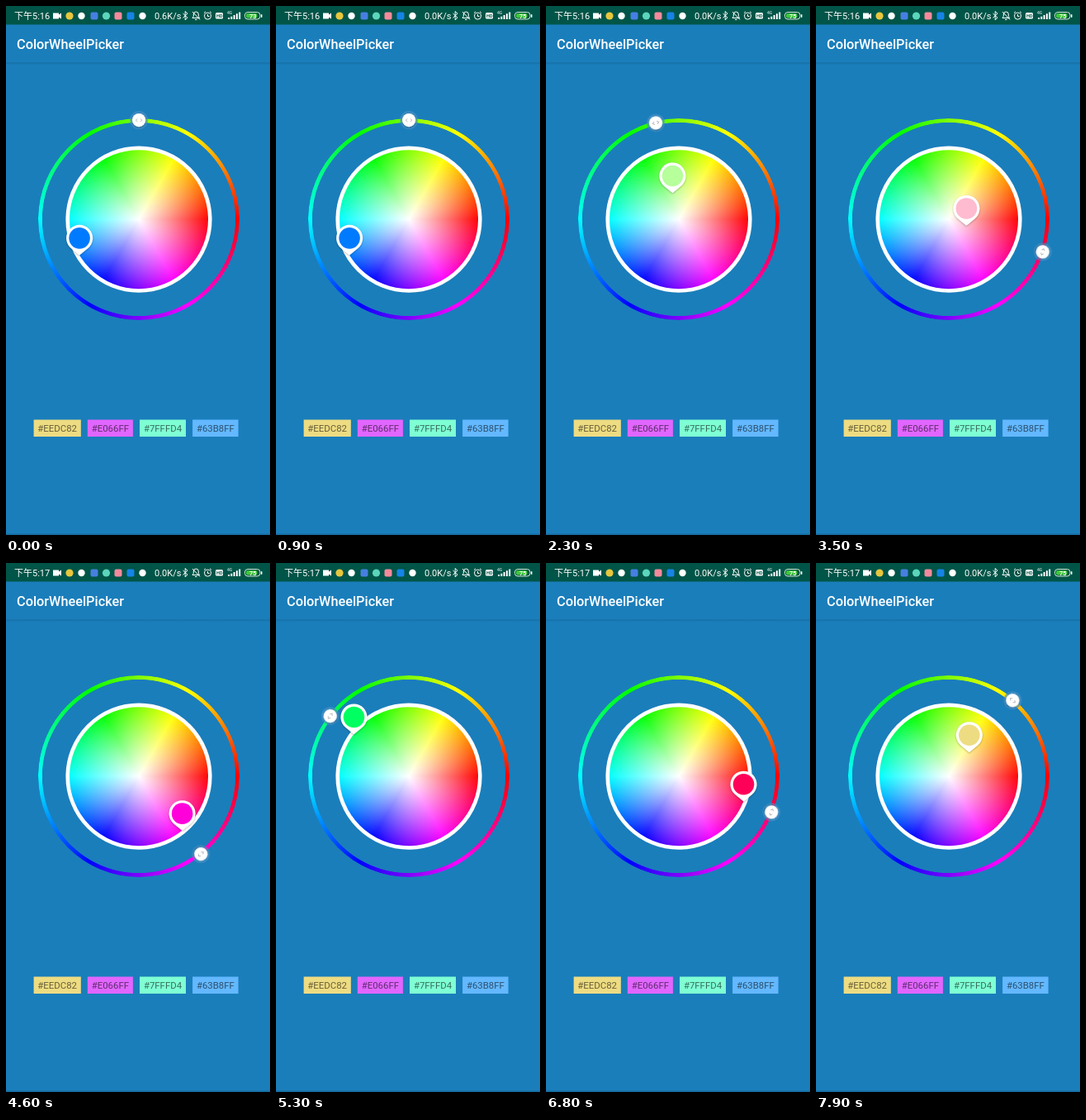
These frames come from a looping animation (320 by 640 pixels, 8 s). An HTML page:

```html
<!DOCTYPE html>
<html lang="en">
<head>
<meta charset="utf-8">
<title>Colour wheel</title>
<style>
  html, body { margin: 0; width: 100%; height: 100%; overflow: hidden; background: #1a7ebb; }
  #stage { position: relative; width: 320px; height: 640px; overflow: hidden; background: #1a7ebb; }
  .disc { position: absolute; border-radius: 50%;
    --hues: conic-gradient(from 90deg, #f00, #f0f, #00f, #0ff, #0f0, #ff0, #f00); }
  #ring { left: 39.2px; top: 136.4px; width: 243.8px; height: 243.8px; background: var(--hues);
    -webkit-mask: radial-gradient(circle, transparent 116.7px, #000 117.5px);
    mask: radial-gradient(circle, transparent 116.7px, #000 117.5px); }
  svg { position: absolute; left: 0; top: 0; }
  #wheel { left: 75px; top: 172px; width: 172px; height: 172px;
    background: radial-gradient(circle closest-side, #fff, rgba(255,255,255,0)), var(--hues); }
  text { font-family: Roboto, sans-serif; }
  #clock { font-family: Roboto, "Noto Sans CJK SC", "Noto Sans CJK", sans-serif; }
</style>
</head>
<body>
<div id="stage">
  <div id="ring" class="disc"></div>
  <div id="wheel" class="disc"></div>
  <svg width="320" height="640" viewBox="0 0 320 640">
    <defs>
      <linearGradient id="edge" x2="0" y2="1">
        <stop stop-color="#000" stop-opacity=".13"/>
        <stop offset="1" stop-color="#000" stop-opacity="0"/>
      </linearGradient>
      <filter id="soft" x="-30%" y="-30%" width="160%" height="160%">
        <feDropShadow dx="0" dy="1" stdDeviation="1" flood-color="#000" flood-opacity=".3"/>
      </filter>
    </defs>
    <circle cx="161" cy="258.2" r="86.3" fill="none" stroke="#fff" stroke-width="4.6"/>
    <rect width="320" height="22.5" fill="#005548"/>
    <rect y="68.4" width="320" height="3" fill="url(#edge)"/>
    <rect y="638.5" width="320" height="1.5" fill="#176b9e"/>
    <text x="13" y="52" font-size="16.3" font-weight="500" fill="#fff">ColorWheelPicker</text>

    <g fill="#fff">
      <text id="clock" x="10" y="16" font-size="11"></text>
      <path d="M57 8.5h7v2l3-2v7l-3-2v2h-7z"/>
      <circle cx="77" cy="12" r="4.6" fill="#e8c63c"/>
      <circle cx="91.5" cy="12" r="4.2"/>
      <rect x="102.5" y="7.5" width="9" height="9" rx="2" fill="#477fe0"/>
      <circle cx="121.5" cy="12" r="4.6" fill="#5bd5bb"/>
      <rect x="131.5" y="7.5" width="9" height="9" rx="2" fill="#f48a9b"/>
      <rect x="146.5" y="7.5" width="9" height="9" rx="2" fill="#1683e6"/>
      <circle cx="165.5" cy="12" r="4.2"/>
      <text id="speed" x="180" y="16" font-size="11"></text>
      <g fill="none" stroke="#fff" stroke-width="1">
        <path d="M214.5 9l5.5 5.2-2.8 2.6V6.5l2.8 2.7-5.5 5.2"/>
        <path d="M226 14.5h8.5l-1.2-2v-2.5a3 3 0 0 0-6 0v2.5zM229 16.5h2.5M226 7l9 9.5"/>
        <circle cx="244.5" cy="12.2" r="4"/>
        <path d="M244.5 10v2.5h2M240 8.5l2-1.8M249 8.5l-2-1.8"/>
      </g>
      <rect x="254" y="8" width="9" height="7.5" rx="1.5"/>
      <text x="255" y="14" font-size="5.5" font-weight="700" fill="#005548">HD</text>
      <text x="268" y="10" font-size="5">4G</text>
      <path d="M269 16v-2h2v2zM272.3 16v-3.2h2V16zM275.6 16v-5h2v5zM278.9 16V9.3h2V16zM282.2 16V7.5h2V16z"/>
      <rect x="289.5" y="7.5" width="18.5" height="8.5" rx="3.5" fill="none" stroke="#d4ecd0"/>
      <rect x="291" y="9" width="13.5" height="5.5" rx="2" fill="#40c63c"/>
      <rect x="309" y="10" width="1.5" height="4" rx=".7"/>
      <text id="battery" x="295" y="14.5" font-size="7.5" font-weight="500"></text>
    </g>

    <g id="chips" font-size="11.4"></g>

    <g id="thumb">
      <circle r="11" fill="#4a90c4" fill-opacity=".65"/>
      <circle r="8.1" fill="#fff" filter="url(#soft)"/>
      <path d="M-1.7-1.8L-3.8 0l2.1 1.8M1.7-1.8L3.8 0 1.7 1.8" fill="none" stroke="#b9b9b9"/>
    </g>
    <g id="pin">
      <path d="M0 0L-10-8.2A16 16 0 1 1 10-8.2Z" fill="#fff" filter="url(#soft)"/>
      <circle id="dye" cy="-20.7" r="12.8"/>
    </g>
  </svg>
</div>
<script>
  const $ = id => document.getElementById(id);
  const CX = 161.1, CY = 258.3, RIM = 84, ORBIT = 120.2;
  const LOOP = 8000, STEP = 100, TOUCH = 1400, TAP = 7800;

  // Pin tip: time, angle in degrees (counter-clockwise), distance from the centre
  const drag = [
    [1400, -8, 50], [1800, 30, 55], [2300, 103.5, 33], [3100, -19, 22.5],
    [4000, -19, 22.5], [4600, -51.3, RIM], [4900, -135, RIM], [5200, -195, RIM],
    [5800, -330, RIM], [6000, -384.3, RIM], [6700, -741, RIM]
  ];

  const chips = [["#EEDC82", 33.6, 57.2], ["#E066FF", 98.8, 55.1], ["#7FFFD4", 162, 56], ["#63B8FF", 226.1, 55.5]];
  $("chips").innerHTML = chips.map(([c, x, w]) =>
    `<rect x="${x}" y="500.5" width="${w}" height="20.5" fill="${c}"/>` +
    `<text x="${x + w / 2}" y="515.2" text-anchor="middle" fill="#000" fill-opacity=".57">${c}</text>`).join("");

  function pinAt(t) {
    if (t < TOUCH) return [211, RIM];
    if (t >= TAP) return [50, 38.4];
    const i = drag.findIndex(k => k[0] > t);
    if (i < 0) return drag[drag.length - 1].slice(1);
    const a = drag[i - 1], b = drag[i], u = (t - a[0]) / (b[0] - a[0]);
    return [1, 2].map(n => a[n] + (b[n] - a[n]) * u);
  }

  function spot(angle, r) {
    const a = angle * Math.PI / 180;
    return `translate(${CX + r * Math.cos(a)} ${CY - r * Math.sin(a)})`;
  }

  function draw(t) {
    const [angle, r] = pinAt(t);
    const hue = (angle % 360 + 360) % 360;
    const turn = t < TOUCH ? 90 : angle;
    $("pin").setAttribute("transform", spot(angle, r));
    $("dye").setAttribute("fill", t >= TAP ? chips[0][0] : `hsl(${hue}, 100%, ${100 - 50 * r / RIM}%)`);
    $("thumb").setAttribute("transform", `${spot(turn, ORBIT)} rotate(${90 - turn})`);
    $("clock").textContent = t < 3800 ? "下午5:16" : "下午5:17";
    $("speed").textContent = t < 500 ? "0.6K/s" : "0.0K/s";
    $("battery").textContent = t < 500 ? "73" : "75";
  }

  const start = performance.now();
  function tick() {
    const t = (performance.now() - start) % LOOP;
    draw(Math.floor(t / STEP) * STEP);
    requestAnimationFrame(tick);
  }
  tick();
</script>
</body>
</html>
```
